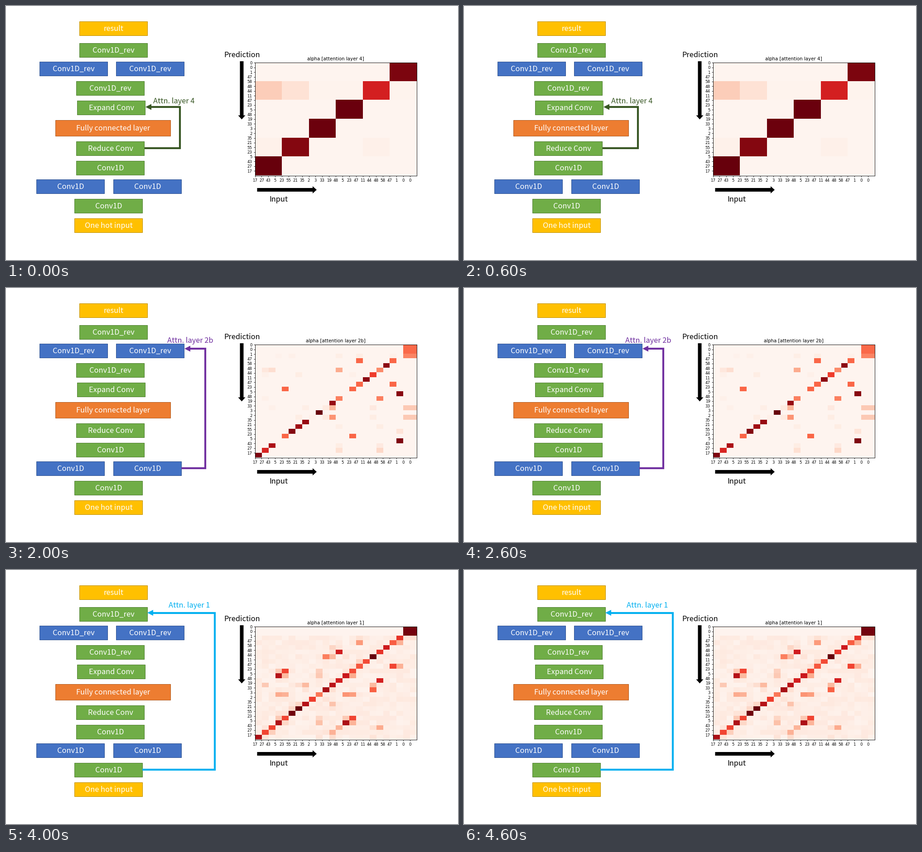
Animation, 998 px wide and 561 px high, one loop 5 s. Source, as a matplotlib script:

```python
import numpy as np
import matplotlib.pyplot as plt
from matplotlib.animation import FuncAnimation
from matplotlib.patches import Polygon, Rectangle

W, H, DPI = 998, 561, 100
PT = 72 / DPI
N = 24
TOKENS = [17, 27, 43, 5, 23, 55, 21, 35, 2, 3, 33, 19,
          48, 5, 23, 47, 11, 44, 48, 58, 47, 1, 0, 0]
SANS = dict(family=["Noto Sans CJK JP", "Liberation Sans"], size=16.4 * PT)

GREEN = "#70ad47", "#507e32"
BLUE = "#4472c4", "#2f528f"
GOLD = "#ffc000", "#bc8c00"
ORANGE = "#ed7d31", "#ae5a21"

fig = plt.figure(figsize=(W / DPI, H / DPI), dpi=DPI, facecolor="white")
stage = fig.add_axes([0, 0, 1, 1])
stage.set(xlim=(0, W), ylim=(H, 0))
stage.axis("off")


def text(x, y, s, color="black", ha="center"):
    return stage.text(x, y + 6, s, color=color, ha=ha, va="baseline",
                      zorder=5, **SANS)


def box(x, y, label, colors, w=151, h=32):
    fill, edge = colors
    stage.add_patch(Rectangle((x + .5, y + .5), w - 1, h - 1, fc=fill,
                              ec=edge, lw=PT))
    text(x + w / 2, y + h / 2, label, "white")


def block_arrow(x, y, length, down=False):
    """Thick black arrow starting at (x, y)."""
    u = np.array([0, length - 9, length - 9, length,
                  length - 9, length - 9, 0])
    v = np.array([-4, -4, -8, 0, 8, 4, 4])
    pts = (x + v, y + u) if down else (x + u, y + v)
    stage.add_patch(Polygon(np.column_stack(pts), fc="black", lw=0))


box(162, 33, "result", GOLD)
box(162, 81, "Conv1D_rev", GREEN)
box(74, 122, "Conv1D_rev", BLUE)
box(243, 122, "Conv1D_rev", BLUE)
box(155, 165, "Conv1D_rev", GREEN)
box(157, 208, "Expand Conv", GREEN)
box(109, 251, "Fully connected layer", ORANGE, 255, 36)
box(155, 298, "Reduce Conv", GREEN)
box(155, 341, "Conv1D", GREEN)
box(67, 382, "Conv1D", BLUE)
box(237, 382, "Conv1D", BLUE)
box(151, 425, "Conv1D", GREEN)
box(151, 468, "One hot input", GOLD)

text(521, 107, "Prediction")
text(601.5, 426, "Input")
block_arrow(520.5, 122, 128.5, down=True)
block_arrow(554.5, 406, 131.5)


# Attention weights: rows are predictions, columns are inputs.

def noise(amp, seed):
    return amp * np.random.default_rng(seed).random((N, N))


def layer_4():
    m = np.full((6, 6), .005)
    for r, v in enumerate([.955, 0, .99, .985, .94, 1]):
        m[r, 5 - r] = v
    m[1] = .19, .11, .012, .015, .72, .015
    m[4, [0, 4]] = .025, .03
    return m.repeat(4, axis=0).repeat(4, axis=1)


def layer_3():
    m = .01 + noise(.045, 3)
    m[:3] = .006
    m[:4, 10] = .045
    m[0, 22:] = .65, .9
    m[1, 22:] = .7, .61
    m[2, 22:] = .1, 1
    m[3, 20:] = .27, .37, .07, .02
    m[5, [2, 7, 11, 12, 18]] = .3, .08, .07, .21, .15
    m[6, [7, 11, 18]] = .2, .17, .07
    m[7, [1, 6, 16, 17]] = .06, .08, .07, .06
    m[8, [14, 15]] = .12, .3
    m[9, [4, 14, 15, 22]] = .28, .35, .08, .26
    m[10, [3, 13, 21]] = .1, .17, .12
    m[11, [2, 11, 12, 20]] = .4, .1, .22, .1
    m[12, [7, 11, 12]] = .07, .2, .09
    m[13, [7, 8, 10, 18]] = .07, .08, .32, .08
    m[14, [9, 10]] = .1, .47
    m[15, [8, 9, 21]] = .11, .14, .07
    m[16, [2, 8, 12]] = .25, .1, .08
    m[17, [2, 7, 12, 18]] = .1, .22, .08, .12
    m[18, [5, 6]] = .08, .12
    m[19, [4, 5, 14]] = .33, .06, .27
    m[20, [3, 13]] = .08, .12
    m[21, [2, 12]] = .27, .18
    m[22, [1, 2, 11, 12]] = .08, .33, .1, .21
    m[23, [1, 11, 18]] = .06, .1, .14
    return m


def layer_2b():
    m = np.full((N, N), .006)
    for r, v in {4: .92, 6: .62, 7: .92, 12: .9, 14: 1, 16: .9, 17: .88,
                 18: .94, 21: .85, 22: .7, 23: .95}.items():
        m[r, N - 1 - r] = v
    # repeated tokens share their weight
    for r, c in (3, 15), (3, 20), (8, 15), (8, 20), (9, 4), (9, 14), (19, 4), (19, 14):
        m[r, c] = .51
    m[:2, 22:] = .5
    m[2, 22:] = .42
    m[2, [3, 5, 12, 15, 20]] = .02, .03, .04, .05, .03
    m[5, [1, 2, 12, 18]] = .08, .13, .3, .4
    m[6, [1, 6, 14]] = .03, .05, .03
    m[[10, 18, 20], 21] = .93, .1, .95
    m[11, [1, 12, 18]] = .03, .43, .43
    m[13, [2, 7, 10, 11, 17]] = .03, .04, .06, .26, .07
    m[15, [6, 8, 10, 11, 17]] = .05, .03, .06, .37, .05
    m[[13, 15], 22:] = .2
    m[17, [12, 18]] = .04, .05
    m[21, [12, 18]] = .05, .07
    m[22, [12, 18]] = .12, .15
    return m


def layer_2a():
    m = np.full((N, N), .006)
    for r in range(2, N):
        m[r, N - r] = .98
    for r, v in {5: .83, 6: .84, 10: .72, 11: .63, 12: .85, 16: .8,
                 19: .9, 20: .54, 21: .6, 22: .92}.items():
        m[r, N - r] = v
    m[0, [10, 22, 23]] = .05, .25, .42
    m[1, [10, 22, 23]] = .04, .2, .6
    m[5, [3, 13]] = .02, .03
    m[6, 2] = .08
    m[10, 4] = .23
    m[11, 3] = .34
    m[12, 2] = .1
    m[16, [3, 20]] = .04, .05
    m[19, 15] = .1
    m[20, 14] = .52
    m[21, 13] = .42
    m[22, 12] = .06
    m[23, 17] = .025
    return m


def layer_1():
    m = .015 + noise(.06, 1)
    m[:2] = .008
    m[:2, 22:] = .97
    m[2, [15, 21, 22, 23]] = .12, .65, .1, .12
    m[3, [15, 20, 21]] = .35, .53, .28
    m[4, [11, 12, 19]] = .16, .09, .74
    m[5, [11, 12, 18]] = .1, .73, .65
    m[6, [10, 11, 13, 17]] = .43, .25, .1, 1
    m[7, [15, 16]] = .16, .58
    m[8, [14, 15, 20, 21]] = .1, .55, .6, .28
    m[9, [3, 4, 9, 13, 14]] = .2, .6, .18, .09, .58
    m[10, [3, 4, 9, 13, 14]] = .82, .25, .2, .75, .3
    m[11, [11, 12, 18]] = .1, .72, .72
    m[12, [1, 6, 7, 11, 17]] = .2, .13, .25, .8, .25
    m[13, [7, 10, 11, 17]] = .1, .87, .12, .52
    m[14, [3, 4, 9, 13, 14]] = .3, .28, .46, .37, .34
    m[15, [8, 10]] = .62, .1
    m[16, [5, 6, 7, 11]] = .08, .15, .82, .22
    m[17, [5, 6, 11]] = .15, 1, .1
    m[18, [3, 4, 5]] = .1, .1, .98
    m[19, [3, 4, 9, 13, 14]] = .2, .6, .16, .2, .6
    m[20, [3, 4, 9, 13, 14]] = .84, .15, .23, .85, .27
    m[21, [1, 2, 12, 17, 18]] = .09, .6, .27, .12, .3
    m[22, [1, 2, 10, 11]] = .6, .18, .1, .28
    m[23, [0, 1, 9, 11, 17]] = .85, .1, .1, .14, .1
    return m


# name, colour, label position, arrow path, plot offset, weights
LAYERS = [
    ("4", "#375623", (325, 208.5),
     [(306, 314), (384, 314), (384, 223), (308, 223)], 0, layer_4()),
    ("3", "black", (331, 166.5),
     [(306, 356.5), (426, 355), (426, 181), (306, 181)], 0, layer_3()),
    ("2b", "#7030a0", (356, 114.5),
     [(387, 398), (440, 398), (440, 134), (394, 134)], 0, layer_2b()),
    ("2a", "#002060", (29, 104),
     [(67, 397.5), (48, 397.5), (48, 132.5), (88, 132.5)], 1, layer_2a()),
    ("1", "#00b0f0", (359, 77),
     [(301, 441), (461, 441), (461, 94.5), (312, 94.5)], 0, layer_1()),
]


def plot_rect(lift):
    return [549.5 / W, (H - 374.5 + lift) / H, 357 / W, 249 / H]


plot = fig.add_axes(plot_rect(0))
heat = plot.imshow(np.zeros((N, N)), cmap="Reds", vmin=0, vmax=1,
                   aspect="auto", interpolation="nearest")
edges = np.arange(N) - .5
plot.set_xticks(edges, TOKENS)
plot.set_yticks(edges, TOKENS[::-1])
plot.tick_params(labelsize=8.6 * PT, labelfontfamily="DejaVu Sans",
                 length=3 * PT, pad=3 * PT, width=.8 * PT)
for spine in plot.spines.values():
    spine.set_linewidth(.9 * PT)
title = plot.set_title("", fontsize=10.3 * PT, family="DejaVu Sans",
                       pad=5 * PT)

link, = stage.plot([], [], lw=4.2 * PT, solid_joinstyle="miter",
                   solid_capstyle="butt", zorder=4)
head = stage.add_patch(Polygon([(0, 0)] * 3, lw=0, zorder=4))
label = text(0, 0, "", ha="left")


def update(i):
    name, color, (lx, ly), path, lift, weights = LAYERS[i]
    tip_x, tip_y = path[-1]
    back = tip_x + 13 * np.sign(path[-2][0] - tip_x)
    xs, ys = zip(*path[:-1], (back, tip_y))
    link.set_data(xs, ys)
    link.set_color(color)
    head.set_xy([(tip_x, tip_y), (back, tip_y - 6.5), (back, tip_y + 6.5)])
    head.set_facecolor(color)
    label.set(position=(lx, ly + 6), text=f"Attn. layer {name}", color=color)
    heat.set_data(weights)
    title.set_text(f"alpha [attention layer {name}]")
    plot.set_position(plot_rect(lift))
    return link, head, label, heat, title


anim = FuncAnimation(fig, update, frames=len(LAYERS), interval=1000,
                     repeat=True, repeat_delay=0, blit=False)
plt.show()
```
